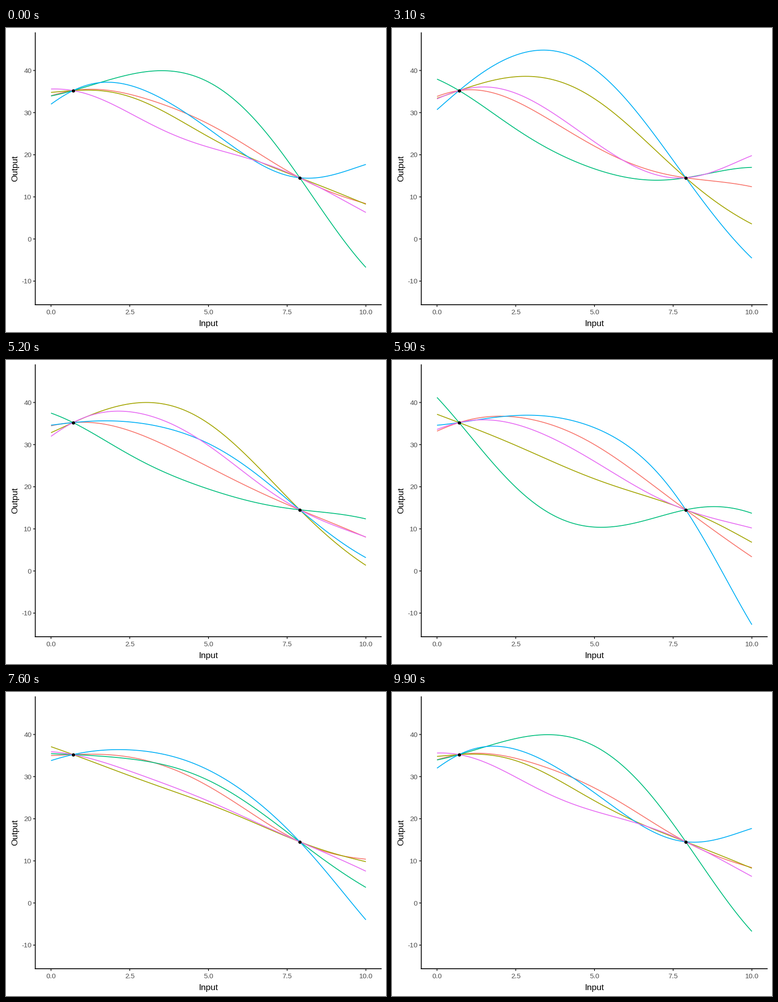
Animation, 837 px wide and 669 px high, one loop 10000 ms. Source, as a matplotlib script:

```python
import numpy as np
import matplotlib.pyplot as plt
from matplotlib.animation import FuncAnimation

WIDTH, HEIGHT, DPI = 837, 669, 64
PT = 72 / DPI  # points per pixel
LEFT, RIGHT, TOP, BOTTOM = 64.5, 827.4, 9.6, 609
TICK = 4.8
STROKE = 1.87
LABEL_SIZE, TITLE_SIZE = 15.4, 19.25
GREY_TICK, GREY_TEXT = "#333333", "#4D4D4D"

COLORS = ["#F8766D", "#A3A500", "#00BF7D", "#00B0F6", "#E76BF3"]
X_SEEN, Y_SEEN = np.array([0.7, 7.9]), np.array([35.23, 14.53])
KNOTS = np.append([0, 2, 4, 6, 10], X_SEEN)
X = np.linspace(0, 10, 101)

# Sampled curve values at the free knots, one row per colour
STATES = [
    [[34, 35.1, 30.7, 23.1, 8.4],
     [34.8, 34.75, 28.55, 20.4, 8.25],
     [33.95, 38.1, 39.7, 31.9, -6.75],
     [32, 37.15, 31.25, 20.8, 17.7],
     [35.6, 31.8, 24.4, 19.7, 6.3]],
    [[33.72, 34.29, 26.41, 18.31, 12.66],
     [33.67, 37.55, 36.24, 26.89, 4.06],
     [38.18, 28.3, 18.94, 14.07, 17.58],
     [30.26, 42.76, 45.56, 34.21, -6.16],
     [33.47, 35.34, 27.44, 17.51, 21.21]],
    [[35.01, 33.37, 26.27, 19.17, 10.02],
     [30.96, 42.11, 44.81, 33.03, -1],
     [35.89, 32.3, 26.51, 19.86, 11.79],
     [34.62, 35.19, 31.92, 24.07, 9.98],
     [31.26, 38.92, 36.02, 25.37, 7.14]],
    [[33.2, 36.75, 33.7, 25.1, 3.35],
     [37.2, 31.4, 24.9, 19.3, 6.8],
     [41.2, 23.75, 12.15, 10.95, 13.7],
     [34.6, 36.6, 36.2, 30, -12.75],
     [33.6, 35.6, 30.25, 21.5, 10.2]],
    [[35.77, 34.39, 30.41, 22.24, 13.42],
     [37.06, 31.69, 26.76, 21.01, 11.09],
     [32.99, 39.25, 40.49, 30.86, -0.59],
     [33.46, 36.31, 33.77, 25.86, -0.25],
     [36.89, 31.31, 25.89, 20.64, 6.41]],
]
MOVE_FRAMES = 10
MOVE_STARTS = np.round(MOVE_FRAMES + 19.7 * np.arange(len(STATES)))


def px(x):
    return 99.17 + 69.35 * x


def py(y):
    return 464.3 - 9.27 * y


def kernel(a, b, length=3):
    return np.exp(-(np.subtract.outer(a, b) / length) ** 2 / 2)


def trend(x):
    slope = np.diff(Y_SEEN) / np.diff(X_SEEN)
    return Y_SEEN[0] + slope * (x - X_SEEN[0])


def gp_curve(values):
    """Gaussian-process mean through the knots and the observed points."""
    residual = np.append(values, Y_SEEN) - trend(KNOTS)
    weights = np.linalg.solve(kernel(KNOTS, KNOTS), residual)
    return trend(X) + kernel(X, KNOTS) @ weights


curves = np.array([[gp_curve(row) for row in state] for state in STATES])
steps = np.roll(curves, -1, axis=0) - curves

plt.rcParams["font.family"] = "Liberation Sans"
fig, ax = plt.subplots(figsize=(WIDTH / DPI, HEIGHT / DPI), dpi=DPI,
                       facecolor="white")
fig.subplots_adjust(left=0, right=1, bottom=0, top=1)
ax.set_xlim(0, WIDTH)
ax.set_ylim(HEIGHT, 0)
ax.axis("off")


def stroke(xs, ys, color):
    return ax.plot(xs, ys, color=color, lw=STROKE * PT, snap=False,
                   solid_capstyle="butt")[0]


def label(x, y, text, size, color, ha="center", rotation=0):
    ax.text(x, y, text, fontsize=size * PT, color=color, ha=ha, va="baseline",
            rotation=rotation, rotation_mode="anchor")


for value in range(-10, 50, 10):
    y = py(value)
    stroke([LEFT - TICK, LEFT], [y, y], GREY_TICK)
    label(56.5, y + 5.5, str(value), LABEL_SIZE, GREY_TEXT, ha="right")
for value in np.linspace(0, 10, 5):
    x = px(value)
    stroke([x, x], [BOTTOM, BOTTOM + TICK], GREY_TICK)
    label(x, 630, f"{value:.1f}", LABEL_SIZE, GREY_TEXT)
stroke([LEFT, LEFT], [TOP, BOTTOM + STROKE / 2], "black")
stroke([LEFT - STROKE / 2, RIGHT], [BOTTOM, BOTTOM], "black")

label((LEFT + RIGHT) / 2, 656, "Input", TITLE_SIZE, "black")
label(25, (TOP + BOTTOM) / 2, "Output", TITLE_SIZE, "black", rotation=90)

lines = [stroke([], [], color) for color in COLORS]
ax.plot(px(X_SEEN), py(Y_SEEN), "o", color="black", ms=7.2 * PT, mew=0,
        zorder=5, snap=False)


def update(frame):
    progress = np.clip((frame - MOVE_STARTS) / MOVE_FRAMES, 0, 1)
    pose = curves[0] + np.tensordot(progress, steps, axes=1)
    for line, ys in zip(lines, pose):
        line.set_data(px(X), py(ys))
    return lines


anim = FuncAnimation(fig, update, frames=100, interval=100, repeat=True,
                     repeat_delay=0)
plt.show()
```
